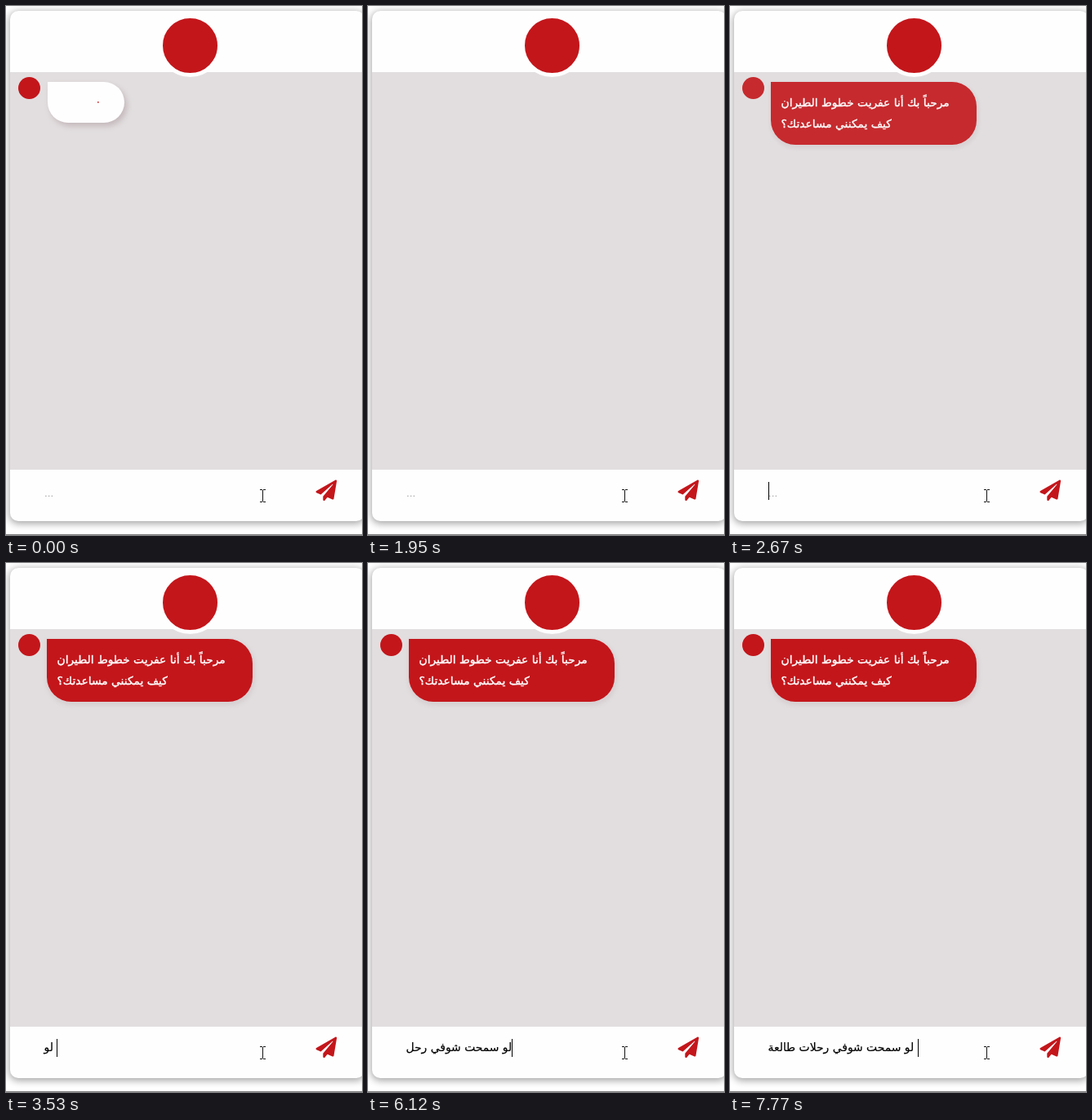
These frames come from a looping animation (436 px wide and 648 px high, 8000 ms). An HTML page:

```html
<!DOCTYPE html>
<html lang="ar">
<head>
<meta charset="utf-8">
<title>Chat</title>
<style>
  html, body { margin: 0; width: 100%; height: 100%; overflow: hidden; background: #fff; }
  body { position: relative; --red: #c3161b; font-family: "DejaVu Sans", sans-serif; }
  body * { position: absolute; box-sizing: border-box; }
  .card { left: 5px; top: 6px; width: 434px; height: 625px; border-radius: 10px; background: #fefefe;
    box-shadow: 0 2px 10px 1px rgba(0, 0, 0, .36); }
  .log { left: 5px; top: 81px; width: 431px; height: 487px; background: #e2dedf; }
  .edge { left: 0; top: 647px; width: 436px; height: 1px; background: #808080; }
  .logo { left: 187px; top: 10px; width: 77px; height: 77px; border: 5px solid #fefefe; border-radius: 50%; background: var(--red); }
  .face { left: 15px; top: 87px; width: 27px; height: 27px; border-radius: 50%; background: var(--red); }
  .wait, .reply { left: 0; top: 0; animation: leave 8s infinite step-end; }
  .reply { animation-name: enter; }
  .dots, .say { top: 93px; border-radius: 0 30px 30px 30px; }
  .dots { left: 51px; width: 94px; height: 50px; background: #fefefe;
    box-shadow: 3px 4px 7px rgba(120, 85, 92, .28); }
  .dots i { top: 18px; width: 14px; height: 14px; border-radius: 50%; background: var(--red);
    animation: pulse 8s infinite ease-in-out; }
  .dots i:nth-child(1) { left: 25px; }
  .dots i:nth-child(2) { left: 40px; animation-delay: -7.84s; }
  .dots i:nth-child(3) { left: 55px; animation-delay: -7.68s; }
  .say { left: 50px; width: 252px; height: 77px; background: var(--red);
    box-shadow: 1px 3px 5px 2px rgba(150, 115, 122, .13); }
  .say p { left: 12.5px; margin: 0; color: #fff; font-size: 13.8px; line-height: 26px; white-space: nowrap;
    -webkit-text-stroke: .4px #fff; }
  .hint { left: 47px; top: 588px; color: #aaa; font: 13.4px/18px "Liberation Sans", sans-serif; }
  .entry { left: 46.5px; top: 583px; height: 22px; }
  .typed { position: static; display: inline-block; height: 22px; white-space: pre; font-size: 13.9px; line-height: 20px;
    color: #000; -webkit-text-stroke: .2px #000; }
  .caret { left: 100%; top: 0; width: 1px; height: 22px; background: #000; animation: blink 8s infinite step-end; }
  svg { left: 0; top: 0; }
  @keyframes pulse {
    0%, 14% { transform: scale(0); }
    7% { transform: scale(1); }
    95.9% { transform: scale(0); animation-timing-function: step-end; }
    96% { transform: scale(.12); animation-timing-function: step-end; }
    98%, 100% { transform: scale(0); }
  }
  @keyframes leave {
    0% { opacity: 1; }
    16.5% { opacity: .87; }
    18.08% { opacity: .68; }
    19.65% { opacity: .48; }
    21.23% { opacity: .28; }
    22.8% { opacity: .1; }
    24.375%, 100% { opacity: 0; }
  }
  @keyframes enter {
    0% { opacity: 0; }
    27.75% { opacity: .2; }
    29.625% { opacity: .51; }
    31.5% { opacity: .76; }
    33% { opacity: .9; }
    34.5% { opacity: .97; }
    36.75%, 100% { opacity: 1; }
  }
  @keyframes blink {
    0%, 8.625%, 21.125%, 34.375% { opacity: 0; }
    2%, 14.625%, 27.75%, 40.375%, 100% { opacity: 1; }
  }
</style>
</head>
<body>
  <div class="card"></div>
  <div class="log"></div>
  <div class="edge"></div>
  <div class="logo"></div>

  <div class="wait">
    <div class="face"></div>
    <div class="dots"><i></i><i></i><i></i></div>
  </div>

  <div class="reply">
    <div class="face"></div>
    <div class="say" dir="rtl">
      <p style="top:12px">مرحباً بك أنا عفريت خطوط الطيران</p>
      <p style="top:38px">كيف يمكنني مساعدتك؟</p>
    </div>
  </div>

  <div class="hint">...</div>
  <div class="entry" dir="ltr"><span class="typed"></span><span class="caret"></span></div>

  <svg width="436" height="648">
    <path fill="#c3161b" transform="translate(379.5 580.5) scale(.05)"
      d="M476 3 12 271C-6 281-3 306 15 314L121 358 408 105C414 100 422 108 417 114L176 407V487C176 511 204 520 218 503L282 426 407 478C421 484 437 475 440 460L512 28C515 8 493-7 476 3Z"/>
    <path fill="none" stroke="#111" d="M311 592.5h3M315 592.5h3M314.5 593v14M311 607.5h3M315 607.5h3"/>
  </svg>

<script>
  const LOOP = 8000;
  const text = 'لو سمحت شوفي رحلات طالعة ';
  // One key press per entry, in ms.
  const keys = [3230, 3380, 3530, 3680, 3950, 4200, 4500, 4650, 4770, 5050, 5170, 5450, 5600,
    5750, 5970, 6120, 6400, 6550, 6670, 6980, 7130, 7290, 7450, 7610, 7770];
  const typed = document.querySelector('.typed');
  const hint = document.querySelector('.hint');
  let start, shown = -1;

  function draw(now) {
    start ??= now;
    const t = (now - start) % LOOP;
    const count = keys.filter(k => k <= t).length;
    if (count !== shown) {
      shown = count;
      typed.textContent = text.slice(0, count);
      hint.style.visibility = count ? 'hidden' : 'visible';
    }
    requestAnimationFrame(draw);
  }
  requestAnimationFrame(draw);
</script>
</body>
</html>
```
